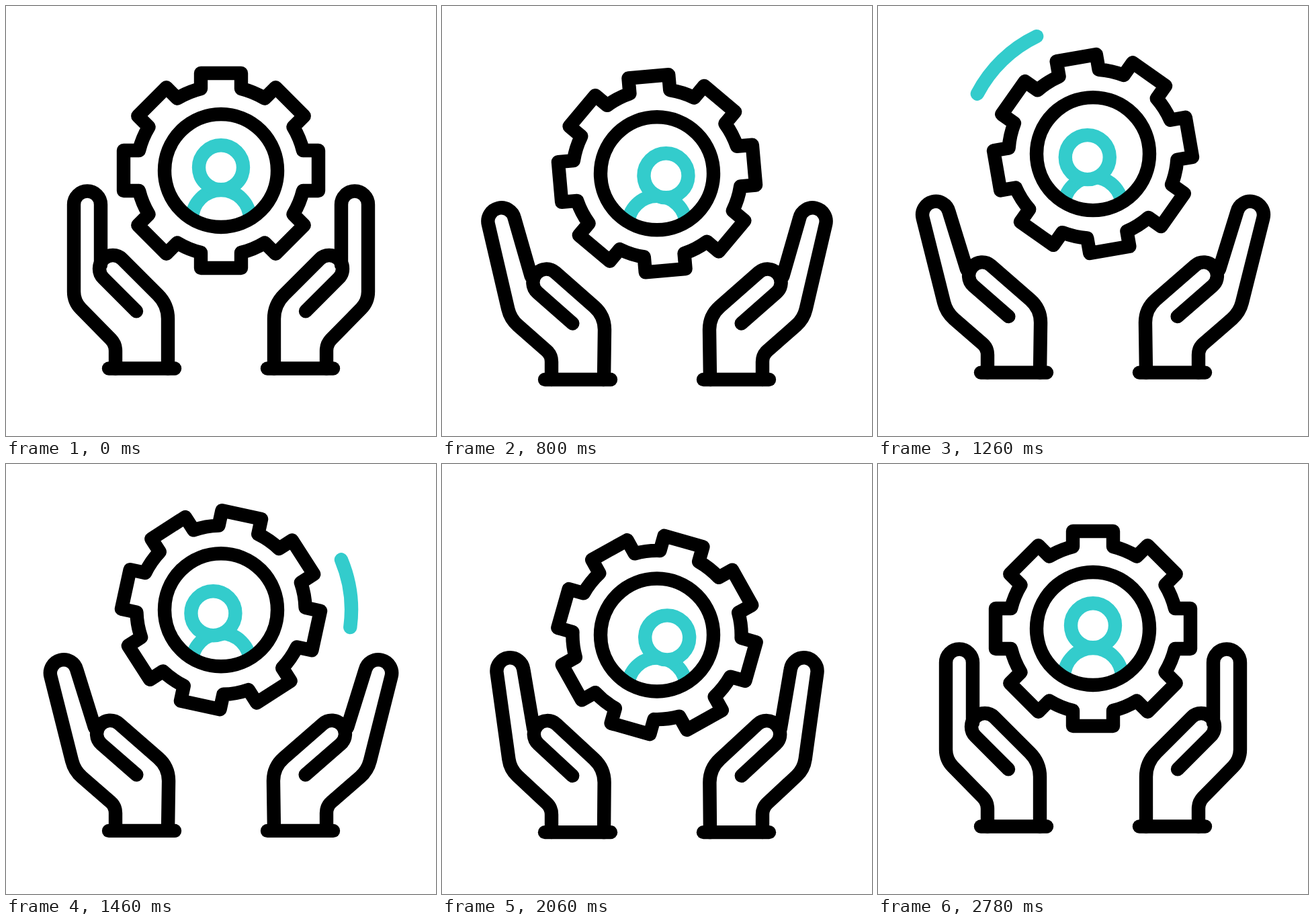
Write an HTML page that moves like this. It is 640 px wide and 640 px high and loops after 3 s.

```html
<!DOCTYPE html>
<html lang="en">
<head>
<meta charset="utf-8">
<title>Hands and gear</title>
<style>
  html, body { margin: 0; width: 100%; height: 100%; overflow: hidden; background: #fff; }
  svg { display: block; width: 100vw; height: 100vh; }
</style>
</head>
<body>
<svg viewBox="0 0 640 640" fill="none" stroke="#000" stroke-width="20.4" stroke-linecap="round" stroke-linejoin="round">
  <defs>
    <clipPath id="lens"><circle r="84"/></clipPath>
    <g id="hand">
      <path id="palm"/>
      <path d="M153 539.5H251"/>
    </g>
  </defs>
  <use href="#hand" class="hand"/>
  <use href="#hand" class="hand"/>
  <g id="wheel">
    <path id="swoosh" stroke="#33cccc"/>
    <path id="gear"/>
    <g clip-path="url(#lens)" stroke="#33cccc">
      <circle id="body" r="43"/>
      <circle id="head" r="33" fill="#fff"/>
    </g>
    <circle r="84"/>
  </g>
</svg>
<script>
const LOOP = 3000;
const $ = id => document.getElementById(id);
const hands = document.querySelectorAll('.hand');

// Eased progress from 0 to 1 between two times.
function ease(t, from, to) {
  const u = Math.min(1, Math.max(0, (t - from) / (to - from)));
  return u * u * (3 - 2 * u);
}

// The point at a distance from another; 0 degrees is right, 90 is down.
function step([x, y], degrees, distance) {
  const a = degrees * Math.PI / 180;
  return [x + distance * Math.cos(a), y + distance * Math.sin(a)];
}

const at = point => point.map(n => n.toFixed(2)).join(' ');

function toward([x, y], [x2, y2], distance) {
  const f = distance / Math.hypot(x2 - x, y2 - y);
  return [x + (x2 - x) * f, y + (y2 - y) * f];
}

// Line to a corner that is rounded off on both sides.
const bendAt = (prev, corner, next, size) =>
  `L${at(toward(corner, prev, size))}Q${at(corner)} ${at(toward(corner, next, size))}`;

function gearPath() {
  const radius = 125.6, arc = `A${radius} ${radius} 0 0 1 `;
  let d = '';
  for (let angle = -90; angle < 270; angle += 45) {
    const corner = (out, side) => at(step(step([0, 0], angle, out), angle + 90, side));
    d += (d ? arc : 'M') + corner(122, -30)
      + `L${corner(145, -30)}L${corner(145, 30)}L${corner(122, 30)}`;
  }
  return d + arc + '-30 -122Z';
}

// bend 0 is an upright hand, 1 an opened one.
function palmPath(bend) {
  const cap = 'A1 1 0 0 1 ';
  const lean = 18 * bend, slope = 45 - 5 * bend;

  const cuff = [163, 539.5], heel = [163, 503];
  const knuckle = [101 + bend, 440 + 12.5 * bend];
  const tipLeft = step(knuckle, -90 - lean, 144.5);
  const tipRight = step(tipLeft, -lean, 40);
  const fingerEnd = step(tipRight, 90 - lean - 4 * bend, 90);

  const thumb = [159 - 5 * bend, 391 + 5.5 * bend];
  const thumbLeft = step(thumb, slope + 90, 20);
  const thumbRight = step(thumb, slope - 90, 20);
  const thumbEnd = step(thumbLeft, slope, 69.5);
  const wristTop = step(thumbRight, slope, 96 + 3 * bend);
  const wrist = [241, 539.5];

  return `M${at(cuff)}`
    + bendAt(cuff, heel, knuckle, 10)
    + bendAt(heel, knuckle, tipLeft, 15)
    + `L${at(tipLeft)}${cap}${at(tipRight)}L${at(fingerEnd)}`
    + `M${at(thumbEnd)}L${at(thumbLeft)}${cap}${at(thumbRight)}`
    + bendAt(thumbRight, wristTop, wrist, 21)
    + `L${at(wrist)}`;
}

function swooshPath(t) {
  const radius = 194;
  const sweep = start => 143 + 254 * ease(t, start, start + 562);
  const tail = sweep(1076), tip = sweep(1018);
  if (tip - tail < .1) return '';
  return `M${at(step([0, 0], tail, radius))}A${radius} ${radius} 0 0 1 ${at(step([0, 0], tip, radius))}`;
}

function draw(t) {
  // Hands: close a little, open, dip, open again, return.
  const close = ease(t, 200, 440), open = ease(t, 540, 940), dip = ease(t, 940, 1350);
  const reopen = ease(t, 1350, 1830), back = ease(t, 1830, 2240);
  const bend = -.18 * close + 1.26 * open + .34 * (reopen - dip) - 1.08 * back;
  const handY = -5.5 * close + 30.5 * open + 21.5 * (reopen - dip) - 27.5 * back
    + 2.5 * ease(t, 2240, 2500);

  // Gear: sink, rise, hover, drop and recover, with one full turn.
  const gearY = 245 + 16 * ease(t, 200, 460) - 41 * ease(t, 540, 1280) - 5.5 * ease(t, 1280, 1640)
    + 44.5 * ease(t, 1820, 2120) - 14 * ease(t, 2120, 2460);
  const gearAngle = -7.2 * ease(t, 560, 940) + 387.2 * ease(t, 1042, 1754) - 20 * ease(t, 1780, 2736);

  // Person: sways against the turn and ducks.
  const sway = 14.2 * ease(t, 560, 840) - 25.8 * ease(t, 1060, 1320)
    + 26.8 * ease(t, 1700, 2040) - 15.2 * ease(t, 2140, 2640);
  const duck = 9.7 * (ease(t, 560, 900) - ease(t, 1900, 2640));

  $('palm').setAttribute('d', palmPath(bend));
  hands[0].setAttribute('transform', `translate(0 ${handY})`);
  hands[1].setAttribute('transform', `translate(640 ${handY}) scale(-1 1)`);
  $('wheel').setAttribute('transform', `translate(320 ${gearY})`);
  $('gear').setAttribute('transform', `rotate(${gearAngle})`);
  $('swoosh').setAttribute('d', swooshPath(t));
  $('head').setAttribute('transform', `translate(${sway} ${duck - 4.7})`);
  $('body').setAttribute('transform', `translate(0 ${72 + duck * .6})`);
}

$('gear').setAttribute('d', gearPath());
const start = performance.now();
function tick() {
  draw((performance.now() - start) % LOOP);
  requestAnimationFrame(tick);
}
tick();
</script>
</body>
</html>
```
